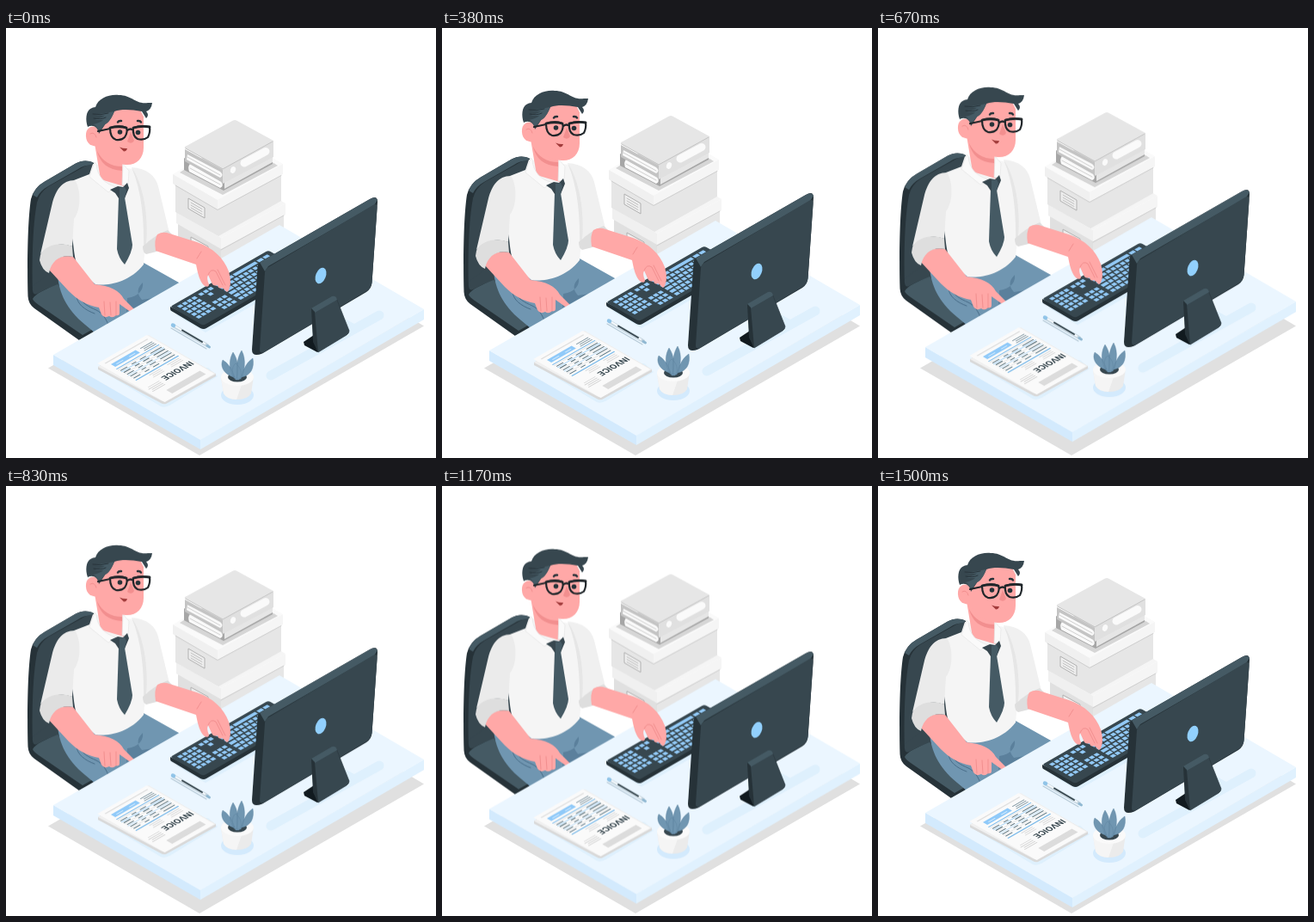
Recreate the animation shown at these times as an HTML page. Size 500 by 500 pixels, loop 1540 ms.

```html
<!DOCTYPE html>
<html lang="en">
<head>
<meta charset="utf-8">
<title>Desk work</title>
<style>
html, body { margin: 0; width: 100%; height: 100%; overflow: hidden; background: #fff; }
svg { display: block; width: 100vw; height: 100vh; }
text { font: bold 10px Roboto, Arial, sans-serif; }
.ln { fill: none; stroke-linecap: round; stroke-linejoin: round; }
</style>
</head>
<body>
<svg viewBox="0 0 500 500">
<path fill="#e0e0e0" d="M49 395.500 312 244 486 346.500 225 497Z"/>
<g id="scene">

<g id="chair">
  <path fill="#263238" d="M102 157C95 153.500 88 154 81 157.500L45 178.500Q32 186 29 199C25 224 24.500 280 25.500 312Q26 321 33 326L85 363 112 350V170Z"/>
  <path fill="#455a64" d="M102 157C95 153.500 88 154 81 157.500L45 178.500Q35 184 31 194L36 197Q40 189 49 184L84 164Q92 159 98 160Z"/>
  <path fill="#37474f" d="M104 159Q95 158 86 164L50 184Q39 191 36 203C31 230 30 270 31 306L60 300 110 250Z"/>
  <path fill="#455a64" d="M31 315C34 309 45 304 60 298L110 345 89 357 38 322Q32 318 31 315Z"/>
  <path fill="#37474f" d="M31 300Q30 312 36 309L62 296 58 280Z"/>
</g>

<g id="boxes">
  <path fill="#e0e0e0" d="M200 220 250 248V275L200 250Z"/>
  <path fill="#e6e6e6" d="M250 248 323 208V242L250 282Z"/>
  <path fill="#f5f5f5" d="M198 214 272 172 325 204 250 244Z"/>
  <path fill="#f0f0f0" d="M198 214 250 244V257L198 227Z"/>
  <path fill="#f5f5f5" d="M250 244 325 204V217L250 257Z"/>
  <path class="ln" stroke="#cfcfcf" d="M250 258 323 218"/>
  <path fill="#f0f0f0" stroke="#b0b0b0" d="M215 243 235 254V266L215 255Z"/>
  <path fill="#e6e6e6" d="M197 178 247 207V242L197 214Z"/>
  <path fill="#e6e6e6" d="M247 207 320 167V201L247 242Z"/>
  <path fill="#fafafa" d="M194 170 268 127 322 158 246 201Z"/>
  <path fill="#f0f0f0" d="M194 170 246 200V211L194 181Z"/>
  <path fill="#f5f5f5" d="M246 200 322 158V170L246 211Z"/>
  <path class="ln" stroke="#cfcfcf" d="M197 183 246 211.500 320 171.500"/>
  <path fill="#f0f0f0" stroke="#b0b0b0" d="M212 198 231 209V221L212 210Z"/>
  <path class="ln" stroke="#bdbdbd" d="M215 203 228 210.500M215 206 228 213.500M215 209 228 216.500"/>
</g>

<g id="binders">
  <path fill="#d6d6d6" d="M202 168 252 194 316 160 300 150 230 150Z"/>
  <path fill="#a6a6a6" d="M207 151 253 177 310 146V158L253 189 207 165Z"/>
  <path fill="#e6e6e6" d="M254 179 310 148V156L254 187Z"/>
  <path fill="#fafafa" d="M214 158 250 178Q254 184 249 186L213 167Q211 161 214 158Z"/>
  <path class="ln" stroke="#d0d0d0" d="M214 163 249 182"/>
  <path fill="#c4c4c4" d="M208 141 252 165V180L208 155Z"/>
  <path fill="#fafafa" d="M211 147 249 167Q254 171 249 174L210 153Z"/>
  <path class="ln" stroke="#d0d0d0" d="M211 150 249 171"/>
  <path fill="#e6e6e6" d="M208 140Q207 138 210 137L264 107.500Q266 106.500 268 107.500L311 131 253 164Z"/>
  <path fill="#e0e0e0" d="M252 164 311 131V150L252 181Z"/>
  <path class="ln" stroke="#c4c4c4" d="M209 140 252 164 310 132"/>
  <path class="ln" stroke="#fafafa" stroke-width="9" d="M277 157 302 143.500"/>
  <ellipse cx="264" cy="165" rx="3" ry="4" fill="#fafafa" transform="rotate(20 264 165)"/>
</g>

<g id="legs">
  <path fill="#7096b1" d="M60 288C62 308 70 327 92 345L104 355 201 299V296L160 273 100 280Z"/>
  <path fill="#5b809c" d="M141 314C155 312 160 304 159 296C153 302 151 308 158 316L171 314 140 330Z"/>
  <path class="ln" stroke="#4a6e8a" d="M85 310C87 320 96 324 105 328C113 332 116 338 119 345M82 311C82 321 92 328 103 332"/>
</g>

<g id="body">
  <path fill="#f5f5f5" d="M101 158 97 170 79 177C70 190 74 225 78 250C80 268 81 276 90 286L104 298C116 300 143 297 160 275L162 254 166 180C158 166 151 164 140 163Z"/>
  <path fill="#f0f0f0" d="M146 162C164 163 174 172 177 184L190 238 163 250C164 220 160 185 146 162Z"/>
  <path fill="#e6e6e6" d="M146 162C160 182 166 220 163 252L160 262C161 225 158 190 146 162Z"/>
  <path fill="#dedede" d="M159 254Q174 240 188 235L193 240Q186 250 175 260L163 263Q159 261 159 254Z"/>
  <path fill="#ffa8a7" d="M103 134 135 150 137 184 110 176Z"/>
  <path fill="#f28f8f" d="M106 143C112 155 122 161 135 161V166C119 165 109 157 106 143Z"/>
  <path fill="#fafafa" stroke="#e6e6e6" stroke-width=".7" d="M103 156 97 173 119 191 128 185C115 181 106 173 105 158ZM136 158 143 166 142 182 135 183Z"/>
  <path fill="#455a64" d="M131 197H138L147 252Q147 260 138 275Q131 268 129 257Z"/>
  <path fill="#37474f" d="M121 188 130 184 136 185 141 180 143 186 138 198H131L127 192Z"/>
  <path fill="#455a64" d="M132 186 138 185 140 189 138 198H132Z"/>
  <path fill="#ebebeb" d="M80 177C65 177 58 189 54 203L40 263Q57 246 77 254L79 222C88 211 87 186 80 177Z"/>
  <path fill="#ffa8a7" d="M49 280C50 270 65 263 78 266L103 298C121 300 132 305 137 315L151 329Q152 333 146 331L132 321 132 331Q132 335 128 334Q124 338 120 335Q114 338 111 333L108 325C95 323 83 316 73 306Z"/>
  <path class="ln" stroke="#f28f8f" d="M121 319 122 334M128 318 128 334M114 318 115 334"/>
  <path fill="#dedede" d="M40 264C45 252 65 248 77 254L78 266C65 263 53 269 50 285Q42 282 39 270Z"/>
</g>

<g id="head">
  <path fill="#ffa8a7" d="M106 112 123 94 155 93 160 103V139C160 152 151 160 139 159C123 158 112 149 106 137Z"/>
  <path fill="#ffa8a7" d="M107 118C104 112 94 114 93 123C92 133 99 139 107 137Z"/>
  <path class="ln" stroke="#f28f8f" d="M98 123Q103 120 105 127"/>
  <path fill="#37474f" d="M95 115C92 107 93 97 98 94Q101 92 104 92C107 82 119 77 131 78C147 78 150 89 165 87L170 87Q169 95 163 97Q167 101 163 105L158 97C146 95 135 94 126 97C123 104 121 108 116 111L108 123C107 114 100 112 95 115Z"/>
  <path fill="#455a64" d="M103 101Q114 99 126 97C122 106 119 111 115 112L108 121Q105 112 101 112 110 110 113 107H103Q112 104 115 102Z"/>
  <path class="ln" stroke="#263238" stroke-width=".9" d="M101 100Q110 102 119 99M102 105Q110 107 116 104"/>
  <path class="ln" stroke="#263238" stroke-width="2.500" d="M130 109.500Q131 107.500 134 108M153 108Q156 107.500 157 109.500"/>
  <path fill="#f28f8f" d="M145 121 149 131Q146 136 141 132Z"/>
  <path fill="#a23b3b" d="M132 138.500Q137 140.500 141 140Q140 143.500 137 143.500Z"/>
  <path fill="#fff" d="M160 115H167Q168 123 165 129H160Z"/>
  <g class="ln" stroke="#20262a" stroke-width="2.200">
    <path d="M121 116C128 114 136 114 140 116Q142 121 138 127Q134 131 128 130Q121 128 121 116ZM148 116C154 114 162 114 167 115Q168 121 165 127Q160 131 153 129Q147 126 148 116ZM141 119Q145 116 148 119M121 117 107 120"/>
    <path stroke-width="2.800" d="M121 116Q131 113.500 140 116M148 116Q157 113.500 167 115"/>
  </g>
  <circle cx="132.500" cy="121" r="2.800" fill="#263238"/><circle cx="153.500" cy="121.500" r="2.800" fill="#263238"/>
</g>

<g id="table">
  <path fill="#d3eafd" d="M55 380 226 478V490L55 392Z"/>
  <path fill="#e0f1fe" d="M226 478 486 327V339L226 490Z"/>
  <path fill="#ebf6ff" d="M55 380 318 229 486 327 226 479Z"/>
  <path class="ln" stroke="#def0fd" stroke-width="11" d="M308 404 434 334"/>
  <path fill="#def0fd" d="M110 398 180 440Q184 442 190 439L246 405 235 395ZM198 334 232 354 300 315 290 300Z"/>
  <ellipse cx="269" cy="427" rx="19" ry="11" fill="#d3eafd"/>
</g>

<g id="pen" class="ln">
  <path stroke="#b8cbd8" stroke-width="1.200" d="M192 349 233 373"/>
  <path stroke="#c6d6e0" stroke-width="4.200" d="M195 346.500 234 369"/>
  <path stroke="#f5f9fc" stroke-width="2" d="M197 347 231 367"/>
  <path stroke="#37474f" stroke-width="1.900" d="M205 351.500 228 365"/>
  <path stroke="#90c4e8" stroke-width="4.500" d="M194 345.500 195 346"/>
  <path stroke="#90b8d2" stroke-width="3" d="M234 369.500 236.500 371"/>
</g>

<g id="stack">
  <path fill="#d9d9d9" d="M107 394 166 358 244 402V405L186 437Q183 438 180 436L107 397Z"/>
  <path fill="#f0f0f0" d="M107 394 166 357 244 402 186 434Q183 435 180 433Z"/>
  <g id="page" transform="matrix(-.87 .5 -.87 -.5 242 402)">
    <rect width="66" height="90" fill="#fafafa"/>
    <rect x="6" y="5" width="45" height="8" fill="#dcdcdc"/>
    <text x="1.500" y="31.500" fill="#37474f">INVOICE</text>
  </g>
</g>

<g id="plant">
  <path fill="#ebebeb" d="M250 407 253 425Q257 432 269 432T285 425L288 405Z"/>
  <path fill="#f5f5f5" d="M250 407 253 425Q257 432 268 432L275 412Z"/>
  <ellipse cx="269" cy="406" rx="19" ry="10" fill="#fafafa"/>
  <ellipse cx="269" cy="406" rx="11" ry="5.500" fill="#37474f"/>
  <path fill="#6088a5" d="M259 403Q269 380 279 403Q269 411 259 403Z"/>
  <path fill="#7096b1" stroke="#5b809c" stroke-width=".4" d="M262 405C252 401 249 392 252 386Q261 391 266 406ZM274 406C276 395 281 388 287 384C289 395 285 404 274 406ZM265 407C258 394 260 384 264 377C270 386 271 397 268 408ZM269 408C267 392 270 381 274 375C280 386 277 400 273 408ZM267 409C261 400 263 393 267 390C274 395 275 404 271 409Z"/>
</g>

<g id="keyboard">
  <path fill="#263238" d="M191 324V327Q191 329 194 330L226 349Q230 351 233 349L340 287V276L229 343Z"/>
  <rect id="keys" width="131" height="44" rx="3" fill="#37474f" transform="matrix(.87 -.5 .87 .5 191 324)"/>
</g>

<g id="hand">
  <path fill="#ffa8a7" d="M176 240Q181 237 187 238L222 249C241 256 253 267 259 283Q263 296 259 305Q257 309 254 304L251 302Q247 304 246 299Q241 301 239 296L235 287Q233 292 236 298Q236 302 231 300C225 295 223 285 221 275L174 259Q172 246 176 240Z"/>
  <path class="ln" stroke="#f28f8f" d="M235 287Q238 279 244 283L252 299M246 281 255 299M222 268Q225 263 227 260"/>
</g>

<g id="monitor">
  <path fill="#def0fd" d="M360 379 404 354 407 345 390 336Z"/>
  <path fill="#111a1f" d="M346 365 358 357 370 370 362 377 347 369Z"/>
  <path fill="#263238" d="M295 272.500 423 199Q432 194 432 202L425.500 296Q425 303 419 307L298 378.500Q286 383 286 374L292.500 278Q293 274 295 272.500Z"/>
  <path fill="#455a64" d="M295 272.500 423 199Q430 195 432 200L428 206 305 277 301 283Z"/>
  <path fill="#37474f" d="M307 277 425 207Q432 202 431.500 210L425.500 296Q425 302 419 306L300 377Q295 379 295 374L301 284Q302 279 307 277Z"/>
  <ellipse cx="366" cy="288" rx="5.800" ry="9.700" fill="#92d0fd" transform="rotate(22 366 288)"/>
  <path fill="#37474f" stroke="#2b383f" stroke-width=".7" d="M356 327 384 314 399 352Q399 355 396 357L363 377 358 365Z"/>
  <path fill="#455a64" d="M355 326 379 312Q384 311 385 316L359 331Z"/>
  <path fill="#263238" d="M355 326 359 330 363 377 357 365Z"/>
</g>
</g>
</svg>
<script>
const $ = id => document.getElementById(id);
const rect = (x, y, w, h, fill) =>
  `<rect x="${x}" y="${y}" width="${w}" height="${h}" fill="${fill}"/>`;

// Key blocks, laid out flat and projected by the keyboard's matrix
let keys = '';
const key = (x, row, w = 4.7) => keys += rect(x, 4 + row * 6.2, w, 4.2, '#92c9f6');
for (let row = 0; row < 6; row++) {
  if (row < 5) for (let c = 0; c < 4; c++) key(5 + c * 6.3, row);
  for (let c = 0; c < 3; c++)
    if (row === 0 || row > 2 || (row === 1 && c === 1)) key(33 + c * 6.3, row);
  if (row === 0) {
    [55, 63, 71, 111, 119].forEach(x => key(x, row, 6.5));
    key(79, row, 30);
  } else {
    const wide = row === 5 ? 5 : 5 + (5 - row) * 1.6;
    key(55, row, wide);
    for (let x = 56.3 + wide; x < 123; x += 6.3) key(x, row);
  }
}
$('keys').insertAdjacentHTML('afterend',
  `<g transform="${$('keys').getAttribute('transform')}">${keys}</g>`);

// Small print on the invoice
let print = '';
const lines = (x, y, w, n, fill, gap = 2.6) => {
  for (let i = 0; i < n; i++) print += rect(x, y + i * gap, w - i % 2 * 2, .9, fill);
};
lines(45, 20, 17, 4, '#cfcfcf');
lines(5, 36, 16, 3, '#d6d6d6');
lines(30, 36, 15, 3, '#d6d6d6');
print += rect(3, 44, 57, 1.3, '#78b9ea');
for (let i = 0; i < 5; i++) {
  const y = 48 + i * 4.4;
  [[4, 15], [25, 8], [38, 6], [50, 9]].forEach(([x, w]) =>
    print += rect(x, y, w, 1.1, '#546e7a'));
  print += rect(3, y + 2.5, 57, .6, i % 2 ? '#90caf9' : '#d6d6d6');
}
print += rect(3, 70, 57, 1.2, '#78b9ea') + rect(25, 74, 33, 6, '#90caf9');
print += rect(29, 76, 8, 1.2, '#d3eafd') + rect(45, 76, 9, 1.2, '#d3eafd');
lines(4, 73, 16, 3, '#78909c');
print += rect(4, 84, 57, 1.5, '#e0e0e0');
$('page').insertAdjacentHTML('beforeend', print);

// Linear float of 10 px, held at 24 steps a second
const LOOP = 1540, STEPS = 36;
const float = Array.from({ length: STEPS + 1 }, (_, n) => ({
  offset: Math.round(n * 150 / STEPS) * 10 / LOOP,
  transform: `translateY(${-10 * (1 - Math.abs(1 - n / 18))}px)`,
  easing: 'step-end'
}));
float.push({ offset: 1, transform: 'translateY(0px)' });
$('scene').animate(float, { duration: LOOP, iterations: Infinity });
</script>
</body>
</html>
```
